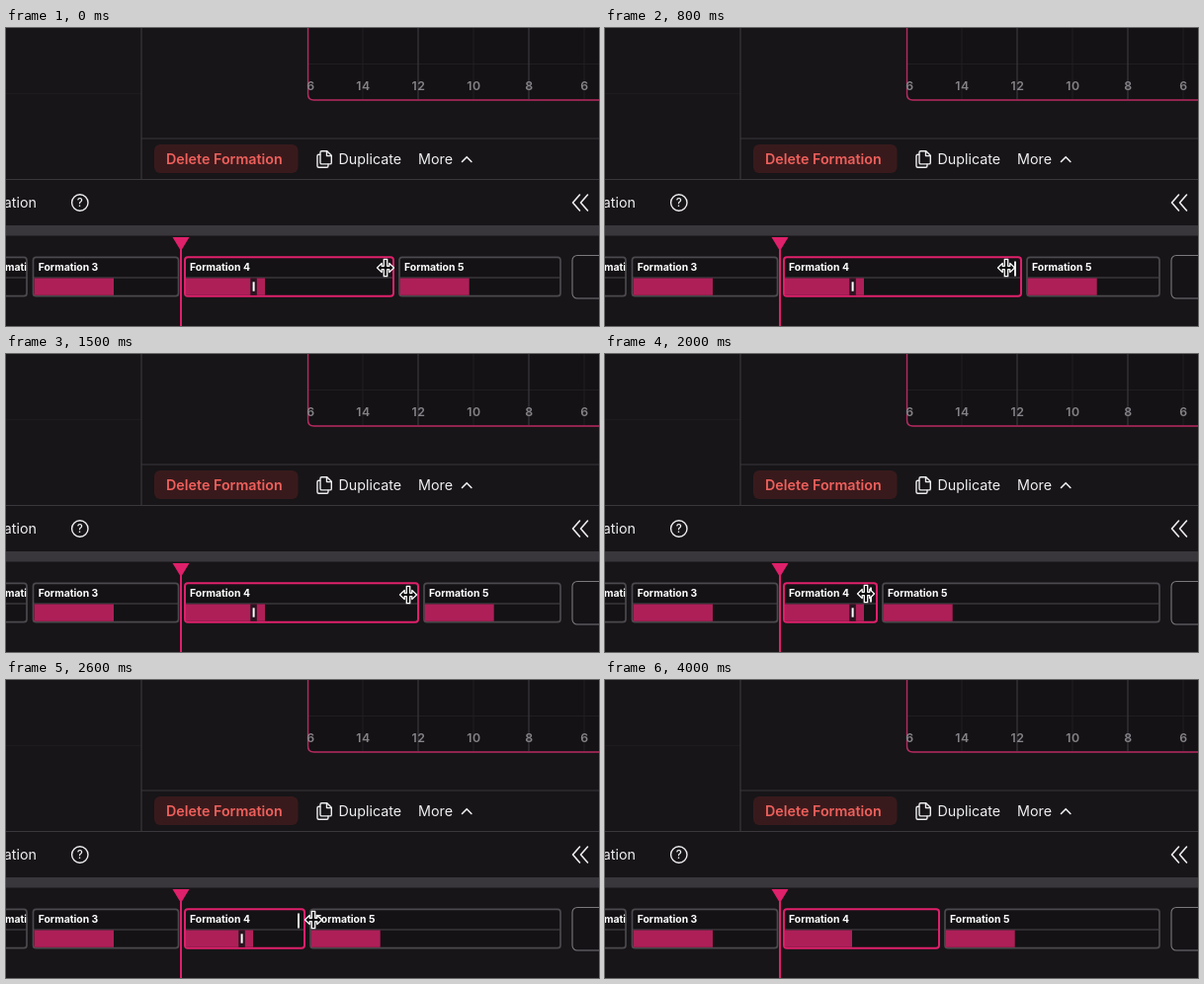
These frames come from a looping animation (600 px wide and 302 px high, 4.1 s). An HTML page:

```html
<!DOCTYPE html>
<html lang="en">
<head>
<meta charset="utf-8">
<title>Formation timeline</title>
<style>
  html, body { margin: 0; width: 100%; height: 100%; overflow: hidden; background: #171518; }
  svg { display: block; width: 600px; height: 302px; font-family: Inter, "Open Sans", sans-serif; }
  .ui { font-size: 14.3px; fill: #f0eff1; }
  .label { font-size: 10.4px; font-weight: 700; fill: #fff; }
  .axis { font-size: 12.3px; font-weight: 600; fill: #858387; letter-spacing: .5px; text-anchor: middle; }
  .box { fill: #141215; stroke: #4b494d; stroke-width: 1.7; }
  .fill { fill: #ae1f58; }
  .icon { fill: none; stroke: #eeedef; stroke-width: 1.4; stroke-linecap: round; stroke-linejoin: round; }
</style>
</head>
<body>
<svg viewBox="0 0 600 302">
  <defs>
    <clipPath id="stageClip"><rect x="304.5" y="0" width="300" height="80"/></clipPath>
    <clipPath id="cardClip"><rect x="0" y="230" width="20.5" height="44"/></clipPath>
  </defs>
  <rect width="600" height="302" fill="#171518"/>

  <g clip-path="url(#stageClip)">
    <path d="M305.5 -5V67q0 6 6 6H610V-5Z" fill="#141215"/>
    <g id="grid"></g>
    <path d="M305.5 -5V67q0 6 6 6H610" fill="none" stroke="#b92b62" stroke-width="1.5"/>
    <g id="axis"></g>
  </g>

  <path d="M0 66.5H137" stroke="#1d1b1e"/>
  <path d="M137 0V153M137 112H600M0 153.5H600" fill="none" stroke="#39373b" stroke-width="1.2"/>

  <rect x="150" y="118" width="145.5" height="29" rx="6" fill="#391a1c"/>
  <text x="162" y="138" font-size="14.3" font-weight="600" fill="#ef605c">Delete Formation</text>
  <g class="icon">
    <path d="M319.5 124.7h5.3l4.5 4.5v7.2q0 1.5-1.5 1.5h-8.3q-1.5 0-1.5-1.5v-10.2q0-1.5 1.5-1.5ZM324.5 125v4.6h4.6"/>
    <path d="M317.7 128.3h-1.2q-1.5 0-1.5 1.5v10q0 1.5 1.5 1.5h8q1.5 0 1.5-1.5v-1.5"/>
    <path d="M461.5 135.5l4.7-4.8 4.7 4.8" stroke-width="1.6"/>
    <circle cx="74.8" cy="177" r="8.2"/>
    <path d="M580.5 169l-7 8 7 8M588.5 169l-7 8 7 8" stroke-width="1.6"/>
  </g>
  <text class="ui" x="336.5" y="138">Duplicate</text>
  <text class="ui" x="417" y="138">More</text>
  <text class="ui" x="31" y="182" text-anchor="end">Formation</text>
  <text x="74.8" y="181.3" font-size="11.5" font-weight="500" fill="#eeedef" text-anchor="middle">?</text>

  <rect y="200" width="600" height="10.5" fill="#39373b"/>

  <rect class="box" x="-80" y="232.3" width="101" height="39.4" rx="3"/>
  <path d="M0 253H20.5" stroke="#4b494d"/>
  <text class="label" x="-17.5" y="246" clip-path="url(#cardClip)">Formation 2</text>

  <rect class="box" x="27.5" y="232.3" width="147" height="39.4" rx="3"/>
  <path d="M28 253H174" stroke="#4b494d"/>
  <rect class="fill" x="28.5" y="253.5" width="80.5" height="17.3"/>
  <text class="label" x="32.7" y="246">Formation 3</text>

  <rect x="573" y="230.5" width="60" height="43.5" rx="5" fill="#151316" stroke="#7b797d" stroke-width="1.1"/>

  <rect id="nextBox" class="box" y="232.3" height="39.4" rx="3"/>
  <path id="nextLine" stroke="#4b494d"/>
  <rect id="nextFill" class="fill" y="253.5" width="70" height="17.3"/>
  <text id="nextLabel" class="label" y="246">Formation 5</text>

  <rect id="curBox" x="181" y="232.3" height="39.4" rx="3" fill="#141215" stroke="#df206b" stroke-width="2"/>
  <path id="curLine" stroke="#4b494d"/>
  <rect id="curFill" class="fill" x="182" y="253.5" height="17.3"/>
  <g id="fillGrip">
    <rect x="-3" y="253.5" width="6.5" height="17.3" fill="#29151f"/>
    <path d="M.3 257.3V266.7" stroke="#fff" stroke-width="2"/>
  </g>
  <text class="label" x="186" y="246">Formation 4</text>
  <path id="edgeGrip" d="M0 236.5V251.5" stroke="#fff" stroke-width="1.8"/>

  <path d="M177 222V302" stroke="#df206b" stroke-width="2"/>
  <path d="M168.5 212H185.5L177 226Z" fill="#df206b"/>

  <path id="cursor" d="M-8.5 0L-3.8 -4.6V-1.7H-1.7V-8.7H1.7V-1.7H3.8V-4.6L8.5 0L3.8 4.6V1.7H1.7V8.7H-1.7V1.7H-3.8V4.6Z"
    fill="#0c0b0d" stroke="#fff" stroke-width="1.3" stroke-linejoin="round"/>
</svg>

<script>
const LOOP = 4100, STEP = 100;
const $ = id => document.getElementById(id);

// [ms, x]
const edgeKeys = [[0, 392], [300, 392], [600, 401], [800, 421], [1000, 422], [1200, 417],
  [1500, 417], [1600, 400], [1800, 305], [1900, 288], [2000, 275], [2200, 252],
  [2400, 273], [2600, 302], [2900, 338], [LOOP, 338]];
const cursorKeys = [[0, 384], [300, 384], [600, 390], [800, 406], [1000, 408], [1200, 407],
  [1500, 407], [1600, 390], [1800, 294], [2000, 264], [2200, 245],
  [2400, 278], [2600, 311], [2900, 347], [LOOP, 347]];

function at(keys, t) {
  const i = Math.max(1, keys.findIndex(k => k[0] >= t));
  const [t0, a] = keys[i - 1], [t1, b] = keys[i];
  return a + (b - a) * (t - t0) / (t1 - t0);
}

function set(id, attrs) {
  for (const name in attrs) $(id).setAttribute(name, attrs[name]);
}

function show(id, on) {
  $(id).style.display = on ? "" : "none";
}

function buildGrid() {
  let lines = '<path d="M305 36.5H600" stroke="#201e21"/>', labels = "";
  for (let i = 0; i < 6; i++) {
    const x = 305 + 56 * i, strong = i === 2 || i === 4;
    lines += `<path d="M${x} 0V72" stroke="${strong ? "#353338" : "#201e21"}" stroke-width="${strong ? 1.4 : 1}"/>`;
    labels += `<text class="axis" x="${x + 0.5}" y="62.5">${16 - 2 * i}</text>`;
  }
  $("grid").innerHTML = lines;
  $("axis").innerHTML = labels;
}

function draw(t) {
  const edge = at(edgeKeys, t);
  // The fill is squeezed by the card and stays short afterwards
  const fillEnd = t < 2200 ? Math.min(262, edge - 2) : 250;
  const active = t < 3100;

  set("curBox", { width: edge - 181 });
  set("curLine", { d: `M182 253H${edge - 1}` });
  set("curFill", { width: fillEnd - 182 });
  set("fillGrip", { transform: `translate(${fillEnd - 11.7})` });
  set("edgeGrip", { transform: `translate(${edge - 6})` });

  set("nextBox", { x: edge + 6, width: 555 - edge });
  set("nextLine", { d: `M${edge + 7} 253H560` });
  set("nextFill", { x: edge + 6.7 });
  set("nextLabel", { x: edge + 11 });

  set("cursor", { transform: `translate(${at(cursorKeys, t)} ${t >= 1200 && t < 1700 ? 244 : 243})` });
  show("fillGrip", active);
  show("cursor", active);
  show("edgeGrip", active && t >= 300 && (t < 1200 || t >= 1700));
}

function frame() {
  draw(Math.floor(performance.now() % LOOP / STEP) * STEP);
  requestAnimationFrame(frame);
}

buildGrid();
frame();
</script>
</body>
</html>
```
